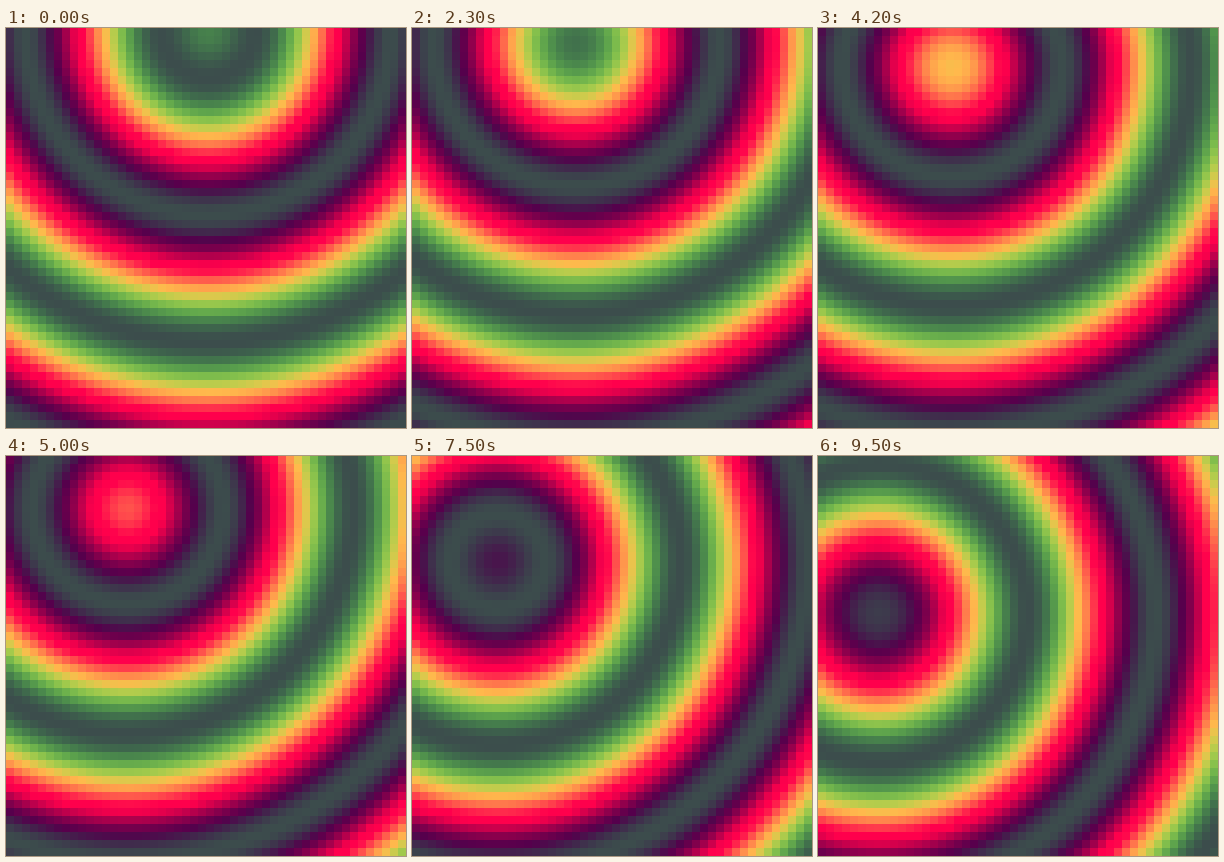
An HTML page with a canvas for the animation above (9.6 s loop, 400x400 px).

```html
<!DOCTYPE html>
<html>
<head>
<meta charset="utf-8">
<title>Plasma rings</title>
<style>
html, body { margin: 0; width: 100%; height: 100%; overflow: hidden; background: #3c4d4d; }
canvas { display: block; width: 400px; height: 400px; }
</style>
</head>
<body>
<canvas id="stage" width="400" height="400"></canvas>
<script>
const ctx = document.getElementById('stage').getContext('2d');
const CELL = 8, COUNT = 50, LOOP = 9600, STEP = 100, RATE = 1 / 24;

// Two shifted waves for red and green over constant blue; CSS clamps the range.
function colorAt(v) {
  const red = 0.735 + 0.5 * Math.cos(v * Math.PI);
  const green = 0.3 + 0.5 * Math.sin(v * Math.PI);
  return `rgb(${Math.round(red * 255)}, ${Math.round(green * 255)}, 76)`;
}

function draw(step) {
  const time = (step + 1) * RATE;
  const cx = 0.5 - 0.5 * Math.sin(time / 5);
  const cy = 0.5 - 0.5 * Math.cos(time / 3);
  for (let row = 0; row < COUNT; row++) {
    for (let col = 0; col < COUNT; col++) {
      const dx = col / COUNT - cx, dy = row / COUNT - cy;
      const v = Math.sin(Math.sqrt(100 * (dx * dx + dy * dy) + 1) + time);
      ctx.fillStyle = colorAt(v);
      ctx.fillRect(col * CELL, row * CELL, CELL, CELL);
    }
  }
}

const start = performance.now();
let last = -1;

function tick() {
  const step = Math.floor((performance.now() - start) % LOOP / STEP);
  if (step !== last) draw(last = step);
  requestAnimationFrame(tick);
}
tick();
</script>
</body>
</html>
```
